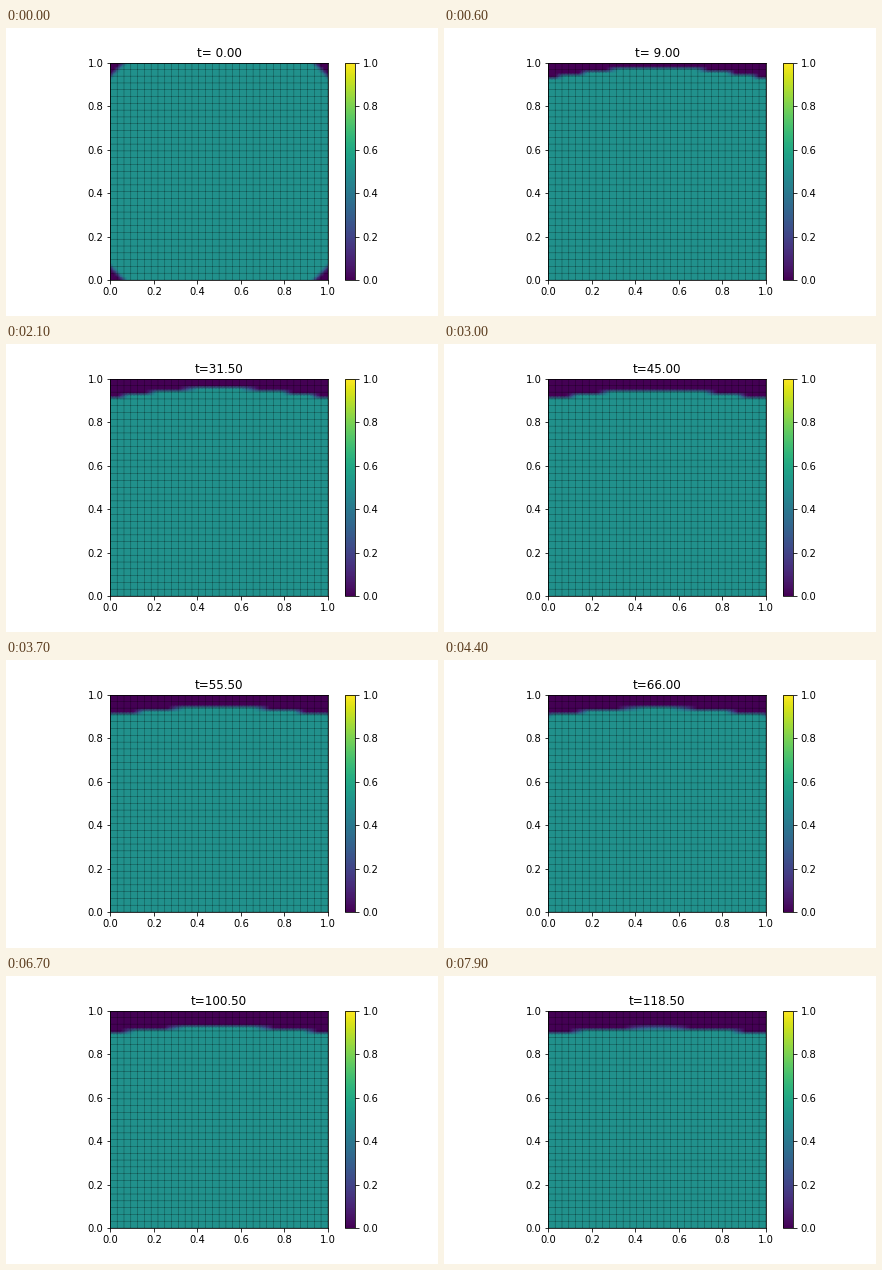
Write a matplotlib script that moves like this. It is 432 by 288 pixels and loops after 8 s.

```python
import numpy as np
import matplotlib.pyplot as plt
from matplotlib.animation import FuncAnimation

FRAMES, INTERVAL, DT = 80, 100, 1.5
CELLS = 32
N = 2 * CELLS  # field nodes sit at half-cell spacing

nodes = np.linspace(0, 1, N + 1)
X, Y = np.meshgrid(nodes, nodes)
U = np.abs(X - 0.5)
ARCH = U**2 - U**4
ROW = (1 - Y) * N  # node rows counted down from the top
RADIUS = np.hypot(X - 0.5, Y - 0.5)

# Depth of the empty layer in rows: base at mid-width, bend towards the walls
KEY_T = [1.5, 6, 18, 45, 66, 79.5, 100.5, 118.5]
BASE = [-0.3, 1.0, 2.18, 3.22, 3.8, 4.33, 4.59, 4.97]
BEND = [19, 17, 15.7, 13.8, 11.5, 9.5, 9.7, 8.7]


def disc(rim):
    """0.5 inside a centred disc, falling to 0 at its rim."""
    return 0.5 * np.clip((rim - RADIUS) / 0.02, 0, 1)


def field(t):
    """Nodal values: 0 in the empty layer, 0.5 in the filled part."""
    if t == 0:
        return disc(0.674)
    depth = np.interp(t, KEY_T, BASE) + np.interp(t, KEY_T, BEND) * ARCH
    value = 0.5 * np.clip(3 * (ROW - depth) + 0.5, 0, 1)
    # the lower corners fill up soon after the start
    return np.where(Y < 0.5, disc(0.674 + 0.008 * t), value)


def mesh_lines():
    """One nan-separated path through all cell edges."""
    c = np.repeat(np.linspace(0, 1, CELLS + 1), 3)
    ends = np.tile([0, 1, np.nan], CELLS + 1)
    return np.r_[c, ends], np.r_[ends, c]


fig, ax = plt.subplots(figsize=(6, 4), dpi=72)
fig.subplots_adjust(left=0.125, right=0.9, bottom=0.125, top=0.88)
surf = ax.pcolormesh(X, Y, field(0), vmin=0, vmax=1,
                     cmap="viridis", shading="gouraud")
ax.plot(*mesh_lines(), "k", lw=0.5, alpha=0.45, snap=False)
ax.set(xlim=(0, 1), ylim=(0, 1), aspect="equal")
fig.colorbar(surf, ax=ax)
title = ax.set_title("")


def update(i):
    t = i * DT
    surf.set_array(field(t))
    title.set_text(f"t={t:5.2f}")
    return surf, title


anim = FuncAnimation(fig, update, frames=FRAMES, interval=INTERVAL,
                     repeat=True, repeat_delay=0, blit=False)
plt.show()
```
